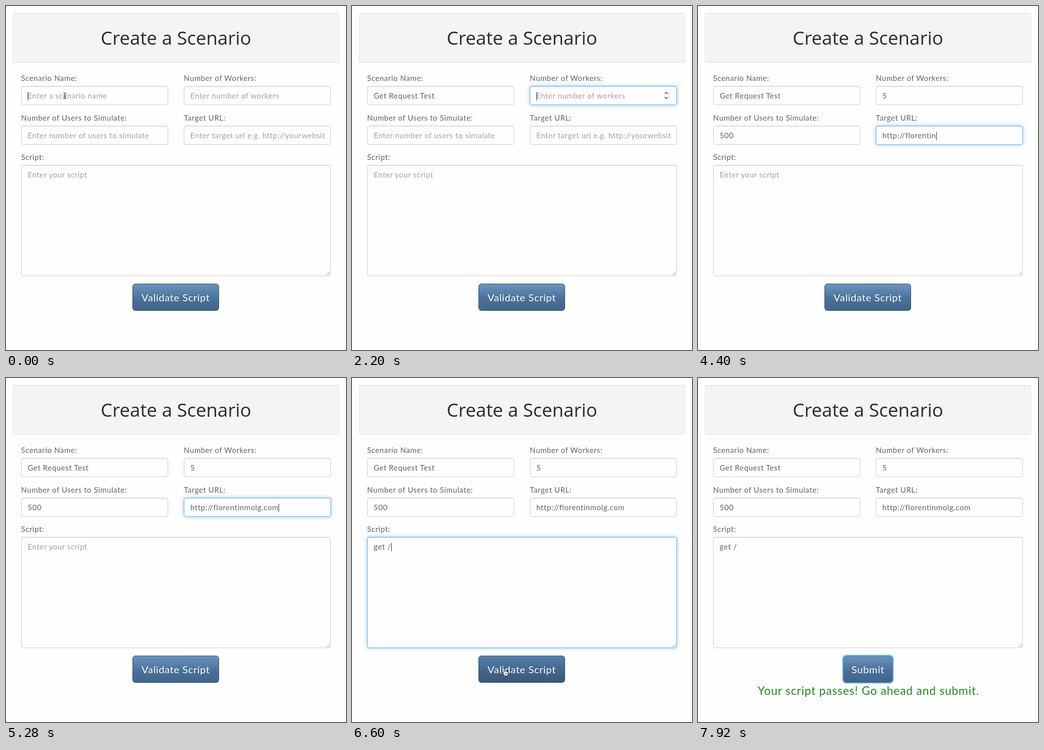
Recreate the animation shown at these times as an HTML page. Size 675x684 px, loop 8360 ms.

```html
<!DOCTYPE html>
<html lang="en">
<head>
<meta charset="utf-8">
<title>Create a Scenario</title>
<style>
  html, body { margin: 0; width: 100%; height: 100%; overflow: hidden; background: #fefefe; }
  body { position: relative; font: 15px/20px Lato, sans-serif; letter-spacing: .6px; color: #626262; }
  body * { box-sizing: border-box; }
  body > * { position: absolute; white-space: pre; }
  h1 {
    left: 14px; top: 14px; width: 647px; height: 99px; margin: 0;
    font: 36.7px/96px "Open Sans", sans-serif; letter-spacing: 0; text-align: center; color: #2b2b2b;
    background: #f4f4f4; border: 1px solid #e3e3e3; border-radius: 4px;
    box-shadow: inset 0 1px 1px rgba(0,0,0,.05);
  }
  .field {
    width: 292px; height: 38px; padding: 8px 12px;
    background: #fefefe; border: 1px solid #ccc; border-radius: 4px;
    box-shadow: inset 0 1px 1px rgba(0,0,0,.075);
  }
  .area { width: 615px; height: 221px; }
  .empty { color: #a0a0a0; }
  .focus {
    border-color: #66afe9;
    box-shadow: inset 0 1px 1px rgba(0,0,0,.075), 0 0 8px rgba(102,175,233,.6);
  }
  .caret::before {
    content: ""; display: inline-block; width: 1px; height: 17px;
    margin-right: -1px; vertical-align: -4px; background: #333;
  }
  .spin { position: absolute; right: 12px; top: 9px; fill: none; stroke: #444; stroke-width: 1.4; }
  .grip { position: absolute; right: 0; bottom: 0; stroke: #999; }
  #button {
    top: 552px; height: 54px; border: 1px solid #2f5377; border-radius: 6px;
    font-size: 20px; line-height: 53px; letter-spacing: .65px; text-align: center; color: #fff;
    text-shadow: 0 -1px 0 rgba(0,0,0,.2);
    background: linear-gradient(#6b94bd, #4a719a 55%, #41658a);
  }
  #button.hover { background: linear-gradient(#5781ab, #426890 50%, #3a5878); }
  #button.ring { border-color: #3d7fc0; box-shadow: 0 0 2px 1.5px #7dbcfb; }
  #message {
    left: 1px; width: 675px; top: 606px; text-align: center;
    font-size: 22.8px; line-height: 30px; letter-spacing: .82px; color: #218821;
  }
</style>
</head>
<body>
<h1>Create a Scenario</h1>
<div id="button"></div>
<div id="message">Your script passes! Go ahead and submit.</div>
<svg id="beam" style="left:112px;top:171px" width="10" height="15" fill="none" stroke="#222">
  <path d="M2 1.5Q5 1.5 5 4V11Q5 13.5 2 13.5M8 1.5Q5 1.5 5 4M5 11Q5 13.5 8 13.5M3.5 8.5H6.5"/>
</svg>
<svg id="hand" style="left:298px;top:577px" width="14" height="17" fill="#fff" stroke="#222">
  <path d="M3.5 9V2.5Q4.5 .8 5.5 2.5V6.5Q7 5 8 6.8Q9.5 5.8 10 7.4Q12 6.8 12 9V12L10.5 15.5H5.5L1.5 10.5Q1.3 8 3.5 9ZM7 10v3M9 10v3"/>
</svg>
<script>
const STEP = 440, COUNT = 19;
const $ = id => document.getElementById(id);

const spinner = '<svg class="spin" width="12" height="18"><path d="M1 6L4 2.5L7 6M1 12L4 15.5L7 12"/><path stroke="#ddd" d="M10.5 2V16"/></svg>';
const grip = '<svg class="grip" width="9" height="9"><path d="M1 8L8 1M5 8L8 5"/></svg>';

// label, placeholder, value, left, top, extra
const fields = [
  ["Scenario Name:", "Enter a scenario name", "Get Request Test", 30, 159, ""],
  ["Number of Workers:", "Enter number of workers", "5", 353, 159, spinner],
  ["Number of Users to Simulate:", "Enter number of users to simulate", "500", 30, 238, spinner],
  ["Target URL:", "Enter target url e.g. http://yourwebsit", "http://florentinmolg.com", 353, 238, ""],
  ["Script:", "Enter your script", "get /", 30, 316, grip],
].map(([label, hint, value, x, y, extra], i) => {
  const add = (cls, top) => {
    const el = document.createElement("div");
    el.className = cls;
    el.style.cssText = `left:${x}px;top:${top}px`;
    document.body.insertBefore(el, $("button"));
    return el;
  };
  add("label", y - 26).textContent = label;
  return { hint, value, extra, base: i == 4 ? "field area" : "field", el: add("", y) };
});

// [active field, characters typed] for each step
const typing = [
  [0, 0], [0, 1], [0, 6], [0, 11], [0, 16],
  [1, 0], [2, 1], [2, 3],
  [3, 0], [3, 7], [3, 16], [3, 20], [3, 24],
  [4, 1], [4, 5], [4, 5], [5, 0], [5, 0], [5, 0],
];

function render(step) {
  const [active, typed] = typing[step];
  fields.forEach((f, i) => {
    const on = i == active;
    const text = f.value.slice(0, on ? typed : i < active ? undefined : 0);
    const caret = on ? '<span class="caret"></span>' : "";
    const extra = f.extra == spinner && !on ? "" : f.extra;
    f.el.className = f.base + (text ? "" : " empty") + (on && step ? " focus" : "");
    f.el.innerHTML = (text ? text + caret : caret + f.hint) + extra;
  });
  const passed = step >= 16, hover = step == 15 || step == 16;
  const button = $("button");
  button.textContent = passed ? "Submit" : "Validate Script";
  button.className = (passed ? "ring " : "") + (hover ? "hover" : "");
  button.style.width = (passed ? 99 : 172) + "px";
  button.style.left = (passed ? 288 : 251) + "px";
  const show = (id, on) => $(id).style.display = on ? "block" : "none";
  show("message", passed);
  show("beam", step == 0);
  show("hand", hover);
}

let last = -1;
function tick() {
  const step = Math.floor(performance.now() / STEP) % COUNT;
  if (step != last) render(last = step);
  requestAnimationFrame(tick);
}
tick();
</script>
</body>
</html>
```
